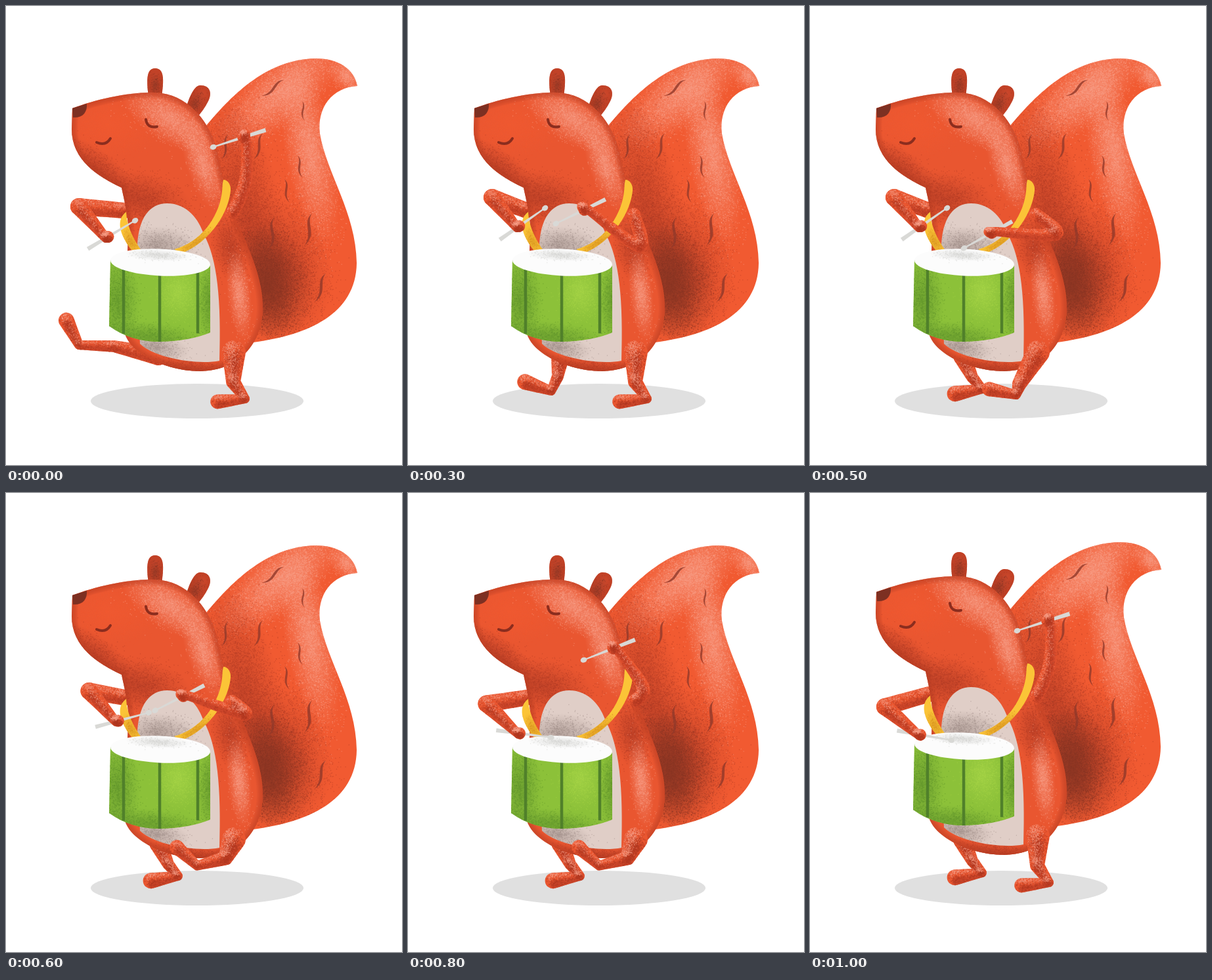
Animation, 603 px wide and 700 px high, one loop 1.1 s. Source, as an HTML page with a canvas:

```html
<!DOCTYPE html>
<html lang="en">
<head>
<meta charset="utf-8">
<title>Drumming squirrel</title>
<style>
html, body { margin: 0; width: 100%; height: 100%; overflow: hidden; background: #fff; }
canvas { display: block; }
</style>
</head>
<body>
<canvas id="stage" width="603" height="700"></canvas>
<script>
const W = 603, H = 700, STEP = 100, STEPS = 11, RAD = Math.PI / 180;
const ORANGE = '#f15a31', RED = '#e95630', DARK = '#b03a24', BROWN = '#873422', LIGHT = '#f8a18b';
const ctx = document.getElementById('stage').getContext('2d');

let seed = 1;
function rnd() {
  seed = (Math.imul(seed, 1664525) + 1013904223) >>> 0;
  return (seed + 1) / 4294967297;
}

// Specks that thin out from the centre of an ellipse.
function grain(g, color, rx, ry) {
  g.fillStyle = color + '70';
  for (let n = rx * ry * 0.5; n > 0; n--) {
    const r = Math.sqrt(-Math.log(rnd())) * 0.6, a = rnd() * Math.PI * 2;
    g.fillRect(Math.cos(a) * r * rx, Math.sin(a) * r * ry, 1.3, 1.3);
  }
}

function blob(g, color, x, y, rx, ry, tilt = 0) {
  g.save();
  g.translate(x, y);
  g.rotate(tilt * RAD);
  grain(g, color, rx, ry);
  g.scale(rx, ry);
  const soft = g.createRadialGradient(0, 0, 0, 0, 0, 1);
  soft.addColorStop(0, color + 'a0');
  soft.addColorStop(1, color + '00');
  g.fillStyle = soft;
  g.fillRect(-1, -1, 2, 2);
  g.restore();
}

// Filled outline with shades clipped to it and an optional soft dark rim.
function shape(g, d, fill, blobs = [], rim = false) {
  const path = new Path2D(d);
  g.save();
  g.fillStyle = fill;
  g.fill(path);
  g.clip(path);
  blobs.forEach(b => blob(g, ...b));
  g.strokeStyle = DARK + '28';
  for (let w = 18; rim && w > 2; w -= 4) {
    g.lineWidth = w;
    g.stroke(path);
  }
  g.restore();
}

function line(g, d, color, width) {
  g.strokeStyle = color;
  g.lineWidth = width;
  g.stroke(new Path2D(d));
}

function ellipse(g, color, ...args) {
  g.fillStyle = color;
  g.beginPath();
  g.ellipse(...args, 0, 7);
  g.fill();
}

function layer(paint) {
  const c = document.createElement('canvas');
  c.width = W;
  c.height = H;
  paint(c.getContext('2d'));
  return c;
}

// Tapered S-shaped tuft around x, y; dx, dy lead to its upper tip.
function tuft(g, x, y, dx, dy) {
  const s = Math.sign(dx), at = (k, off) => `${x + dx * k - dy * off * s} ${y + dy * k + dx * off * s}`;
  g.fillStyle = '#92392acc';
  g.fill(new Path2D(`M${at(1, 0)}C${at(0.3, -0.5)} ${at(-0.1, 0.4)} ${at(-1, 0)}C${at(-0.1, 0.65)} ${at(0.3, -0.25)} ${at(1, 0)}Z`));
}

const tail = layer(g => {
  shape(g, 'M535 122C530 94 502 79 470 80C400 82 348 130 303 185L330 400L376 513C460 502 533 470 534 392C533 315 488 255 478 195C473 155 497 124 535 122Z', ORANGE, [
    [LIGHT, 420, 130, 125, 48, -40],
    [LIGHT, 462, 220, 38, 150, -10],
    [LIGHT, 520, 106, 34, 24, 40],
    [DARK, 365, 320, 60, 190, -12],
    [DARK, 420, 400, 75, 110, -12],
    [BROWN, 402, 425, 65, 95, -8],
    [BROWN, 395, 420, 45, 90, -8]
  ]);
  [[406, 125, 17, -12], [453, 160, -2, -15], [384, 214, 7, -20], [448, 245, -4, -17], [428, 282, -4, -18],
    [404, 347, 4, -24], [460, 341, 6, -25], [478, 430, 9, -22], [333, 215, 5, -19]].forEach(t => tuft(g, ...t));
});

const body = layer(g => {
  shape(g, 'M217 138C214 115 213 95 227 95C242 95 240 115 237 138Z', '#cf482c', [[BROWN, 227, 122, 13, 26]], true);
  shape(g, 'M273 160C277 145 285 121 296 121C311 121 314 133 308 145C303 155 297 163 289 172Z', '#cf482c', [[BROWN, 286, 150, 16, 28, 25]], true);
  shape(g, 'M101 156C140 141 200 128 237 133C281 139 311 180 321 218C331 260 337 296 352 332C372 372 392 420 391 462C390 515 355 556 295 557C240 556 185 528 180 495L186 350C188 330 181 300 176 277C140 260 100 235 100 188Z', RED, [
    [ORANGE, 160, 180, 80, 50],
    [LIGHT, 250, 172, 85, 36, 32],
    [LIGHT, 300, 240, 26, 75, -18],
    [DARK, 140, 250, 80, 28, 38],
    [DARK, 205, 295, 80, 42, 12],
    [DARK, 342, 368, 30, 55, -10],
    [LIGHT, 355, 440, 18, 70, -6],
    [DARK, 275, 555, 110, 22, 4]
  ], true);
  shape(g, 'M101 156L123 149C124 162 117 171 102 170Z', '#7d3022');
  g.lineCap = 'round';
  line(g, 'M138 208Q152 214 159 202', '#8b2d1e', 4);
  line(g, 'M213 173Q215 187 230 184', '#8b2d1e', 4);
  shape(g, 'M200 372C200 322 220 301 245 301C276 301 294 326 301 348C322 385 328 450 325 541C290 548 225 536 204 515Z', '#e0cec7', [
    ['#9c8a84', 232, 366, 58, 30],
    ['#9c8a84', 225, 520, 55, 22, 10]
  ]);
});

const drum = layer(g => {
  const gold = '#fbc437', amber = '#d58f1c', leaf = '#5f922b', grey = '#cfcfcc';
  shape(g, 'M183 314C168 325 171 347 192 373L206 373C192 352 184 335 183 314Z', gold, [[amber, 190, 360, 12, 26, -20]]);
  shape(g, 'M331 265C338 265 343 273 342 282C339 312 315 357 268 377L256 371C298 360 322 322 328 290C330 280 329 272 331 265Z', gold, [[amber, 290, 362, 40, 16, -35]]);
  shape(g, 'M159 387L157 488Q190 512 234 512Q280 511 311 498L311 396Z', '#8cc139', [
    [leaf, 170, 450, 34, 75],
    [leaf, 215, 505, 90, 24, 5],
    [leaf, 310, 450, 20, 70],
    ['#a8d648', 262, 435, 36, 50]
  ]);
  g.globalCompositeOperation = 'source-atop';
  for (const x of [179, 234, 292]) line(g, `M${x} 391V${512 - ((x - 235) / 16) ** 2}`, '#50802a', 4.5);
  g.globalCompositeOperation = 'source-over';
  ellipse(g, '#fcfcfc', 235, 391, 76, 20.5, 0.045);
  blob(g, grey, 232, 380, 50, 9, 3);
});

// A limb runs from a fixed root over a joint to an end, then on to a tip at
// an angle. Keys: step, joint x, y, end x, y, angle of the tip (or stick).
const raised = [365, 266, 365, 199, 162], ready = [128, 292, 166, 338, -35], struck = [114, 331, 164, 373, 10];
const stand = [346, 573, 364, 599, 174], pass = [319, 576, 314, 593, 192], under = [247, 566, 262, 584, 170];
const nearArm = { root: [344, 318], radii: [10, 10, 7, 9], reach: 4, bend: 1, keys: [
  [0, ...raised], [1, 359, 268, 333, 202, 144], [3, 352, 366, 272, 309, 154],
  [5, 374, 348, 280, 344, 151], [7, 350, 326, 267, 272, 155], [9, ...raised]] };
const farArm = { root: [181, 312], radii: [12, 13, 7, 9], reach: 4, bend: 0, keys: [
  [0, 111, 306, 152, 354, -31], [1, 120, 298, 152, 352, -34], [3, ...ready], [5, ...ready],
  [7, 125, 312, 168, 359, 5], [9, ...struck], [10, ...struck]] };
const nearLeg = { root: [347, 528], radii: [18, 11, 7, 11], reach: 42, bend: 0, keys: [
  [0, ...stand], [4, ...stand], [5, ...pass], [7, 350, 537, 268, 544, 253], [9, ...pass], [10, ...stand]] };
const farLeg = { root: [232, 534], radii: [14, 9, 7, 12], reach: 42, bend: 0, keys: [
  [0, 165, 519, 111, 517, 243], [1, 168, 541, 126, 551, 228], [3, 228, 565, 218, 587, 199], [4, ...under], [10, ...under]] };

function pose({ root, radii, reach, keys }, step) {
  const k = keys.findLastIndex(key => key[0] <= step);
  const from = keys[k], to = keys[k + 1] || [STEPS, ...keys[0].slice(1)];
  const t = (step - from[0]) / (to[0] - from[0]);
  const [jx, jy, x, y, deg] = from.map((v, i) => v + (to[i] - v) * t).slice(1);
  const tip = [x + reach * Math.cos(deg * RAD), y + reach * Math.sin(deg * RAD)];
  return { x, y, deg, pts: [root, [jx, jy], [x, y], tip].map((p, i) => [...p, radii[i]]) };
}

// Points along the bones; bend 0 keeps them straight, 1 gives a smooth curve.
function trace(pts, bend, parts = 8) {
  const run = [pts[0]];
  for (let i = 1; i < pts.length; i++) {
    const b = pts[i - 1], c = pts[i], a = pts[i - 2] || b, d = pts[i + 1] || c;
    for (let k = 1; k <= parts; k++) {
      const t = k / parts, ease = t * t * (3 - 2 * t);
      run.push(b.map((v, j) => v + (c[j] - v) * ease
        + bend / 2 * ((c[j] - a[j]) * t * (1 - t) ** 2 - (d[j] - v) * t * t * (1 - t))));
    }
  }
  return run;
}

function limb(pts, bend) {
  const run = trace(pts, bend), path = new Path2D(), shade = new Path2D(), q = Math.PI / 2;
  run.slice(1).forEach(([u, v, s], i) => {
    const [x, y, r] = run[i], a = Math.atan2(v - y, u - x);
    path.moveTo(x + r * Math.cos(a + q), y + r * Math.sin(a + q));
    path.arc(x, y, r, a + q, a + 3 * q);
    path.arc(u, v, s, a - q, a + q);
    path.closePath();
    shade.lineTo(u + 2, v + s * 0.6);
  });
  ctx.save();
  ctx.fillStyle = RED;
  ctx.fill(path);
  ctx.clip(path);
  ctx.lineCap = ctx.lineJoin = 'round';
  ctx.strokeStyle = DARK + '38';
  for (const w of [14, 9, 5]) {
    ctx.lineWidth = w;
    ctx.stroke(shade);
  }
  seed = 7;
  for (const [x, y, r] of run) {
    ctx.save();
    ctx.translate(x, y + r * 0.3);
    grain(ctx, DARK, r, r);
    ctx.translate(-r * 0.3, -r);
    grain(ctx, LIGHT, r, r * 0.6);
    ctx.restore();
  }
  ctx.restore();
}

function stick({ x, y, deg }) {
  ctx.save();
  ctx.translate(x, y);
  ctx.rotate(deg * RAD);
  ctx.fillStyle = '#d9d9d6';
  ctx.fill(new Path2D('M52-1L-32-3.2V3.2L52 1Z'));
  ellipse(ctx, '#d9d9d6', 52, 0, 5, 4, 0);
  ctx.restore();
}

function draw(step) {
  const arm = pose(farArm, step), beat = pose(nearArm, step);
  ctx.fillStyle = '#fff';
  ctx.fillRect(0, 0, W, H);
  ellipse(ctx, '#e0e0e0', 291, 602.5, 162, 26.5, 0);
  ctx.save();
  ctx.translate(0, step % 6 === 4 ? -5 : 0);
  ctx.drawImage(tail, 0, 0);
  limb(pose(farLeg, step).pts, farLeg.bend);
  limb(arm.pts.slice(0, 2), farArm.bend);
  ctx.drawImage(body, 0, 0);
  ctx.drawImage(drum, 0, 0);
  stick(arm);
  limb(arm.pts.slice(1), farArm.bend);
  limb(pose(nearLeg, step).pts, nearLeg.bend);
  stick(beat);
  limb(beat.pts, nearArm.bend);
  ctx.restore();
}

const start = performance.now();
let shown = -1;
function tick() {
  const step = Math.floor((performance.now() - start) / STEP) % STEPS;
  if (step !== shown) draw(shown = step);
  requestAnimationFrame(tick);
}
tick();
</script>
</body>
</html>
```
